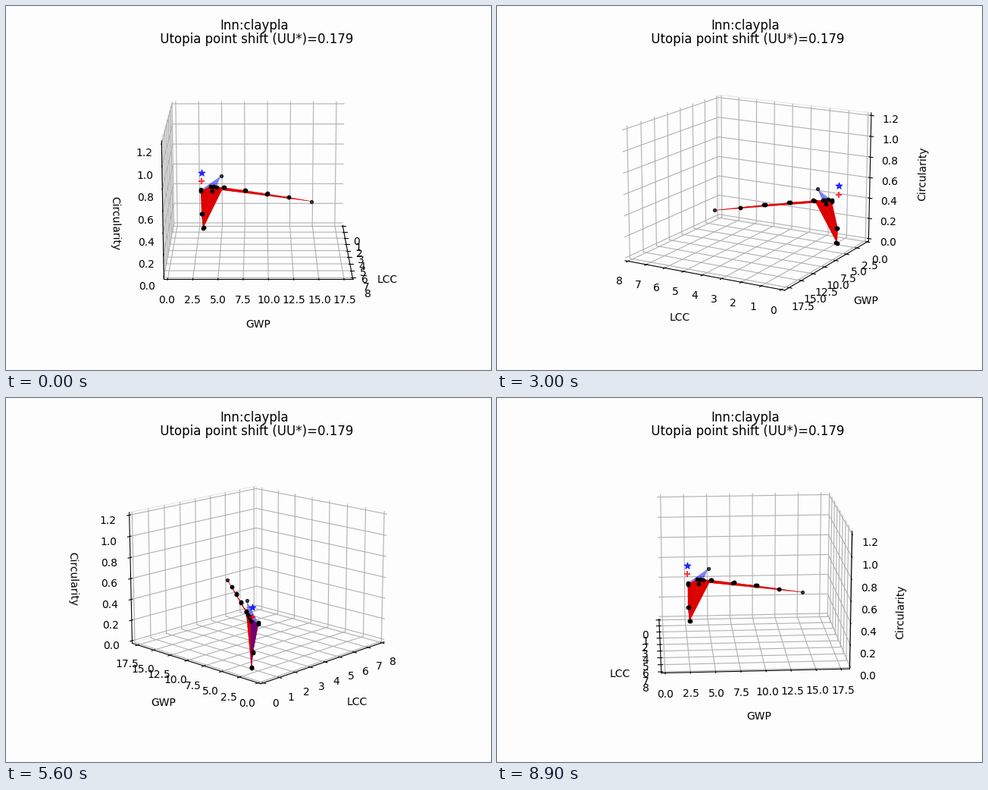
Write a matplotlib script that moves like this. It is 640 by 480 pixels and loops after 9 s.

```python
import numpy as np
import matplotlib.pyplot as plt
from matplotlib.animation import FuncAnimation
from mpl_toolkits.mplot3d.art3d import Poly3DCollection

FRAMES, INTERVAL = 90, 100
PAPER, RED = "#fdfdfd", "#dc0000"


def point(*xyz):
    return np.array(xyz)


# LCC, GWP, circularity
low = point(0.775, 2.94, 0.005)
mid = point(0.79, 2.79, 0.146)
rim = point(1.13, 2.78, 0.395)
inner = point(1.18, 3.96, 0.402)
peak = point(1.40, 4.96, 0.561)
tip = point(4.40, 14.50, 0.476)

# short bend, then a straight run to the tip that levels off in height
bend = np.linspace((1.08, 3.78, 0.439), (1.23, 4.45, 0.443), 3)
chain = np.linspace((1.47, 5.20, tip[2]), tip, 5)
chain[:, 2] -= 0.026 * np.linspace(1, 0, 5) ** 1.6

nudge = point(0.05, 0.11, 0.004)
mid_twin = mid + nudge
rim_top = rim + point(0, 0, 0.013)
twins = np.array([low, mid, *chain[:3]]) + nudge


def utopia(points):
    x, y, z = np.transpose(points)
    return point(x.min(), y.min(), z.max())


def strip(points, *apexes):
    """Triangles joining each step of a path to each apex."""
    return [(apex, p, q) for apex in apexes for p, q in zip(points, points[1:])]


root = (inner + bend[0]) / 2
red_faces = strip([mid, mid_twin, inner, chain[0]], low)
red_faces += strip([mid, mid_twin, inner], rim)
red_faces += strip([rim, *bend, chain[0]], inner) + strip(chain, root)
blue_faces = strip([rim_top, bend[0], bend[-1]], peak)
blue_faces += strip([rim_top, mid, low], bend[0])

fig = plt.figure(figsize=(6.4, 4.8), dpi=100, facecolor=PAPER)
ax = fig.add_subplot(projection="3d", computed_zorder=False, facecolor=PAPER)
ax.set_title("Inn:claypla\n Utopia point shift (UU*)=0.179", linespacing=1.0)

red = Poly3DCollection(red_faces, facecolors=RED, edgecolors=RED,
                       linewidths=0.3, zorder=2)
blue = Poly3DCollection(blue_faces, facecolors=(0, 0, 0.93, 0.5),
                        edgecolors="none", linewidths=0, zorder=1)
ax.add_collection3d(red)
ax.add_collection3d(blue)


def dots(points, **style):
    ax.scatter(*np.transpose(points), depthshade=False, zorder=5, **style)


dots([low, mid, rim, rim_top, inner, *bend, *chain[:-1], *twins],
     c="black", s=10, linewidths=1)
dots([tip, peak], c="black", s=9, linewidths=0.8, alpha=0.75)
dots([utopia([low, rim, peak])], c="blue", marker="*", s=42, linewidths=0.8,
     alpha=0.8)
dots([utopia([low, rim, tip])], c="red", marker="+", s=36, linewidths=1.5,
     alpha=0.8)


def padded(top):
    return -top / 48, top + top / 48


ax.set(xlim=padded(8), ylim=padded(18), zlim=padded(1.2))
ax.set_xlabel("LCC", labelpad=10.5)
ax.set_ylabel("GWP", labelpad=10.5)
ax.set_zlabel("Circularity", labelpad=10.5)
for axis, edge in ((ax.xaxis, PAPER), (ax.yaxis, "#ececec"), (ax.zaxis, "#f4f4f4")):
    axis.pane.set(facecolor=PAPER, edgecolor=edge, alpha=1)


def update(i):
    azim = 360 * i / FRAMES
    # a hair past zero keeps the side wall on the left in the head-on view
    ax.view_init(elev=15, azim=azim or 1e-6)
    # the blue sheet is the nearer one while the tip points away
    blue.set_zorder(3 if 147 < azim < 329 else 1)
    return []


anim = FuncAnimation(fig, update, frames=FRAMES, interval=INTERVAL,
                     init_func=lambda: update(0), repeat=True, repeat_delay=0)
plt.show()
```
